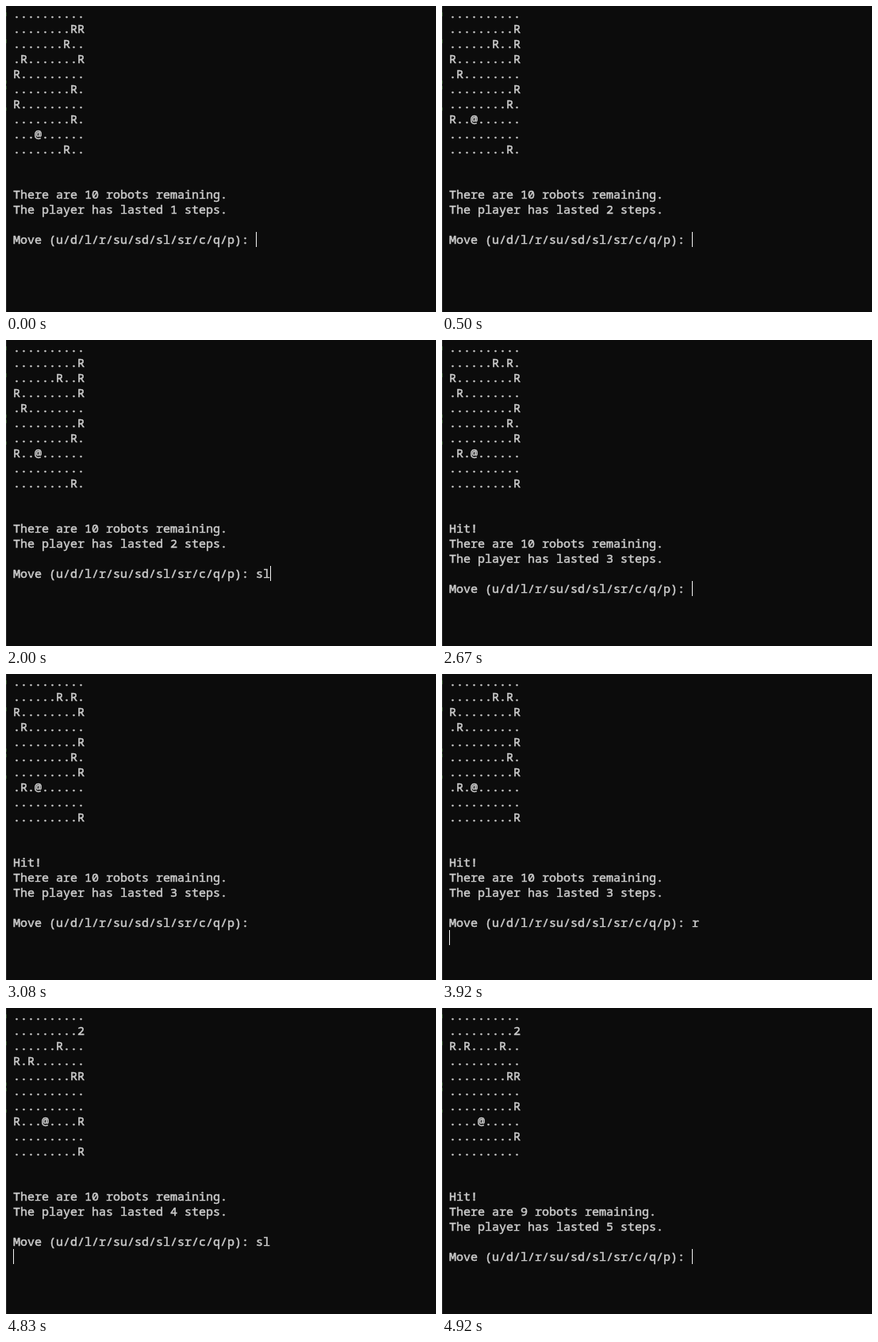
An HTML page for the animation above (5 s loop, 542x386 px).

```html
<!DOCTYPE html>
<html lang="en">
<head>
<meta charset="utf-8">
<title>Robots</title>
<style>
  html, body { margin: 0; height: 100%; overflow: hidden; background: #0c0c0c; }
  svg { display: block; }
  text {
    font: 15px "Noto Sans Mono", "DejaVu Sans Mono", monospace;
    fill: #ccc; stroke: #ccc; stroke-width: .5px; white-space: pre;
  }
</style>
</head>
<body>
<svg id="screen" width="542" height="386" viewBox="0 0 542 386">
  <rect width="542" height="386" fill="#0c0c0c"/>
  <rect width="1" height="386" fill="#2b2b2b"/>
  <path d="M.5 8v5M.5 42v5M.5 94v4M.5 101v4M.5 128v4" stroke="#3c5a34"/>
  <rect id="cursor" width="1" height="19" fill="#f2f2f2"/>
</svg>
<script>
const CELL_W = 9, CELL_H = 19, LEFT = 9, BASELINE = 15, ROWS = 18, LOOP = 5000;
const PROMPT = "Move (u/d/l/r/su/sd/sl/sr/c/q/p): ";

// Each turn: the non-empty board rows by index, robots left, hit flag.
const turns = [
  { robots: 10, rows: { 1: "........RR", 2: ".......R..", 3: ".R.......R", 4: "R.........",
    5: "........R.", 6: "R.........", 7: "........R.", 8: "...@......", 9: ".......R.." } },
  { robots: 10, rows: { 1: ".........R", 2: "......R..R", 3: "R........R", 4: ".R........",
    5: ".........R", 6: "........R.", 7: "R..@......", 9: "........R." } },
  { robots: 10, hit: true, rows: { 1: "......R.R.", 2: "R........R", 3: ".R........", 4: ".........R",
    5: "........R.", 6: ".........R", 7: ".R.@......", 9: ".........R" } },
  { robots: 10, rows: { 1: ".........2", 2: "......R...", 3: "R.R.......", 4: "........RR",
    7: "R...@....R", 9: ".........R" } },
  { robots: 9, hit: true, rows: { 1: ".........2", 2: "R.R....R..", 4: "........RR",
    6: ".........R", 7: "....@.....", 8: ".........R" } }
];

// [start ms, turn, typed input, cursor: "on" | "off" | "below"]
const steps = [
  [0, 0, "", "on"],
  [500, 1, "", "on"],
  [1170, 1, "", "off"],
  [1750, 1, "", "on"],
  [1830, 1, "s", "on"],
  [2000, 1, "sl", "on"],
  [2670, 2, "", "on"],
  [3080, 2, "", "off"],
  [3830, 2, "", "on"],
  [3920, 2, "r", "below"],
  [4000, 3, "", "on"],
  [4580, 3, "", "off"],
  [4670, 3, "s", "on"],
  [4750, 3, "sl", "on"],
  [4830, 3, "sl", "below"],
  [4920, 4, "", "on"]
];

const screen = document.getElementById("screen");
const cursor = document.getElementById("cursor");
const lines = Array.from({ length: ROWS }, (_, row) => {
  const line = document.createElementNS(screen.namespaceURI, "text");
  line.setAttribute("x", LEFT);
  line.setAttribute("y", row * CELL_H + BASELINE);
  return screen.insertBefore(line, cursor);
});

function show([, index, input, state]) {
  const { robots, rows, hit } = turns[index];
  const out = Array.from({ length: 10 }, (_, row) => rows[row] || ".".repeat(10));
  out.push("", "");
  if (hit) out.push("Hit!");
  out.push(`There are ${robots} robots remaining.`,
    `The player has lasted ${index + 1} steps.`, "", PROMPT + input);
  lines.forEach((line, row) => line.textContent = out[row] || "");

  const below = state === "below";
  const column = below ? 0 : PROMPT.length + input.length;
  cursor.setAttribute("x", LEFT + column * CELL_W);
  cursor.setAttribute("y", (out.length - 1 + below) * CELL_H);
  cursor.setAttribute("visibility", state === "off" ? "hidden" : "visible");
}

let current;
const start = performance.now();
function tick() {
  const time = (performance.now() - start) % LOOP;
  const step = steps.filter(s => s[0] <= time).pop();
  if (step !== current) show(current = step);
  requestAnimationFrame(tick);
}
tick();
</script>
</body>
</html>
```
